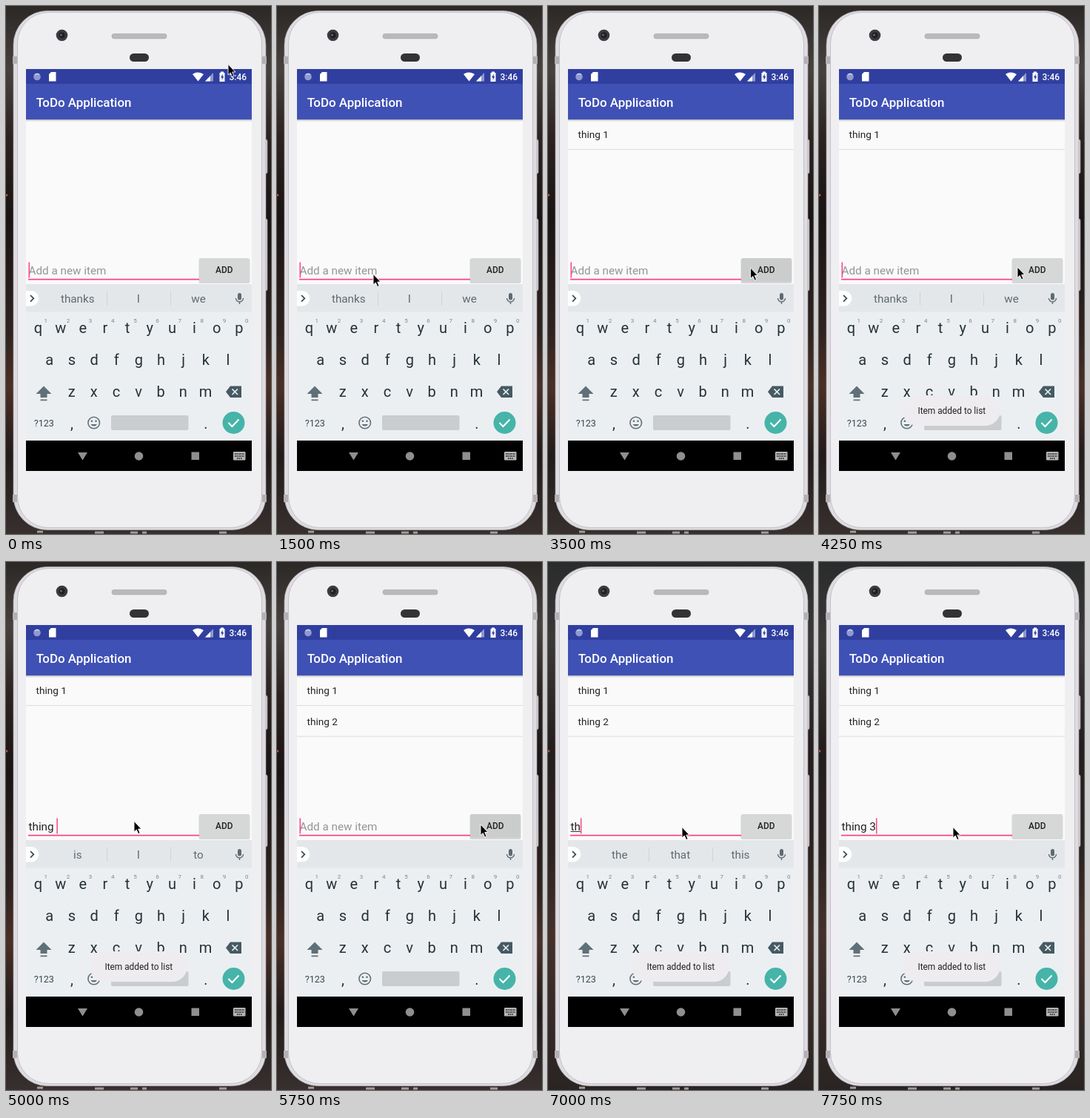
Write an HTML page that moves like this. It is 358 px wide and 712 px high and loops after 8 s.

```html
<!DOCTYPE html>
<html lang="en">
<head>
<meta charset="utf-8">
<title>ToDo Application</title>
<style>
  html, body { margin: 0; width: 100%; height: 100%; overflow: hidden; background: #1d1817; }
  svg { display: block; width: 358px; height: 712px; font-family: Roboto, sans-serif; }
  text { white-space: pre; }
  .mid { text-anchor: middle; }
  .key { font-size: 20px; fill: #263238; }
  .digit { font-size: 8px; fill: #78868c; }
  .word { font-size: 15.25px; fill: #5f6b71; }
  .entry { font-size: 15.25px; }
  .item { font-size: 13.55px; fill: #222; }
  .bold { font-weight: 500; }
</style>
</head>
<body>
<svg viewBox="0 0 358 712">
  <defs>
    <linearGradient id="room" x2="0" y2="1">
      <stop offset="0" stop-color="#2b2826"/><stop offset=".12" stop-color="#47413d"/>
      <stop offset=".25" stop-color="#2c2220"/><stop offset=".4" stop-color="#1a1414"/>
      <stop offset=".62" stop-color="#30231f"/><stop offset=".72" stop-color="#4a2f26"/>
      <stop offset=".85" stop-color="#231b1a"/><stop offset="1" stop-color="#37302e"/>
    </linearGradient>
    <linearGradient id="roomLate" x2="0" y2="1">
      <stop offset="0" stop-color="#2a2b2c"/><stop offset=".15" stop-color="#3b3938"/>
      <stop offset=".35" stop-color="#251d1d"/><stop offset=".55" stop-color="#2c2220"/>
      <stop offset=".7" stop-color="#45302a"/><stop offset="1" stop-color="#292423"/>
    </linearGradient>
    <linearGradient id="shade" x2="0" y2="1">
      <stop stop-color="#000" stop-opacity=".25"/><stop offset="1" stop-color="#000" stop-opacity="0"/>
    </linearGradient>
  </defs>

  <rect id="backdrop" width="358" height="712"/>
  <circle cx="1" cy="255" r="1.5" fill="#b0523c"/>
  <path d="M42 709h8M120 710h12M168 710h10M184 710h6M288 710h10" stroke="#a39b96" stroke-width="3"/>

  <!-- phone -->
  <g fill="#d6d4d8" stroke="#aaa8ac" stroke-width=".7">
    <rect x="348" y="180" width="5" height="46" rx="2"/>
    <rect x="348" y="287" width="5" height="97" rx="2"/>
    <rect x="10" y="6.5" width="341" height="700" rx="46" fill="#dedce0"/>
  </g>
  <path d="M9 68h6v10h-6zM346 68h6v10h-6zM9 659h6v10h-6zM346 659h6v10h-6z" fill="#b3b1b5"/>
  <rect x="15.5" y="8.5" width="330" height="695" rx="42" fill="#efeef1" stroke="#c3c1c7"/>
  <circle cx="75.5" cy="39.5" r="7.8" fill="#3b3b3d"/>
  <circle cx="75.5" cy="39.5" r="4" fill="#1d2025"/>
  <circle cx="74.5" cy="39" r="1.6" fill="#596476"/>
  <rect x="143" y="37.5" width="74" height="6.5" rx="3" fill="#b9b8bb" stroke="#a5a4a7" stroke-width=".6"/>
  <rect x="167" y="64" width="26" height="11" rx="5.5" fill="#333335"/>

  <!-- app -->
  <rect x="27" y="85" width="305" height="542" fill="#fafafa"/>
  <rect x="27" y="105" width="305" height="48" fill="#3f51b5"/>
  <rect x="27" y="85" width="305" height="20" fill="#303f9f"/>
  <rect x="27" y="153" width="305" height="3" fill="url(#shade)"/>
  <g fill="#fff">
    <circle cx="42" cy="95.5" r="4.8" fill="#8f9ad0"/>
    <path d="M39 93a4.2 4.2 0 0 1 6-.5" stroke="#cdd3ee" stroke-width="1.5" fill="none"/>
    <path d="M61 89h6.5v12.500h-9.500V92z"/>
    <path d="M252 92q7.500-5 15 0l-7.500 9.500z"/>
    <path d="M280 90v11.500h-11z" fill="#8f99cd"/><path d="M276 94.200v7.300h-7z"/>
    <path d="M290 88.500h4v1.500h1.500v12h-7V90h1.500z"/>
    <path d="M292.700 91.500l-2.700 5h1.700v3.500l2.500-5h-1.500z" fill="#303f9f"/>
    <text class="bold" x="301.500" y="99.700" font-size="12">3:46</text>
    <text class="bold" x="40.700" y="135.700" font-size="16.940">ToDo Application</text>
  </g>
  <g id="items"></g>

  <rect x="30" y="367.800" width="231" height="1.700" fill="#ff4081"/>
  <text id="entry" class="entry" x="30.500" y="362"></text>
  <rect id="underline" x="30.500" y="363" height="1" fill="#333"/>
  <rect id="caret" y="345.500" width="1.500" height="21" fill="#ff4081"/>
  <rect x="260.500" y="341" width="69" height="33" rx="2" opacity=".14"/>
  <rect id="button" x="261" y="340" width="68" height="32" rx="2"/>
  <text class="mid bold" x="294.800" y="360" font-size="11.860" fill="#222">ADD</text>

  <!-- keyboard -->
  <rect x="27" y="375" width="305" height="211" fill="#eceff1"/>
  <rect x="27" y="375" width="305" height="37.500" fill="#e4e7e9"/>
  <path d="M27 384h7a10 10 0 0 1 0 20.500h-7z" fill="#fff"/>
  <path d="M33 390l4.300 4.300-4.300 4.300" fill="none" stroke="#37474f" stroke-width="1.700"/>
  <rect x="313" y="387" width="5" height="9.500" rx="2.500" fill="#5f6b71"/>
  <path d="M310.500 394a5 5 0 0 0 10 0M315.500 399v3" fill="none" stroke="#5f6b71" stroke-width="1.400"/>
  <g id="words">
    <path d="M136.500 385v19M222.500 385v19" stroke="#d0d4d6"/>
    <text class="mid word" x="96.800" y="400"></text>
    <text class="mid word" x="178.800" y="400"></text>
    <text class="mid word" x="260" y="400"></text>
  </g>
  <g id="keys"></g>
  <g fill="#607078">
    <path d="M51 512.500l10.500 10.500h-6v5h-9v-5h-6zM46.500 530.500h9v1.800h-9z"/>
    <path d="M303 512.500h15v15.500h-15l-6-7.750z" fill="#455a64"/>
    <path d="M305.500 516.500l7.500 7.500m0-7.500l-7.500 7.500" stroke="#eceff1" stroke-width="1.700"/>
    <text class="mid" x="51.300" y="566.500" font-size="12.600" fill="#37474f">?123</text>
    <circle cx="118.700" cy="562" r="7.800" fill="none" stroke="#607078" stroke-width="1.600"/>
    <circle cx="115.900" cy="559.800" r="1.300"/><circle cx="121.500" cy="559.800" r="1.300"/>
    <path d="M114.500 564h8.400a4.500 4 0 0 1-8.400 0z"/>
  </g>
  <rect x="142" y="552" width="104.500" height="20" rx="2" fill="#c9cdcf"/>
  <circle cx="307.500" cy="562" r="15" fill="#46b4a9"/>
  <path d="M300.500 562l5 5 9-9.500" fill="none" stroke="#fff" stroke-width="2"/>

  <rect x="27" y="586" width="305" height="41"/>
  <g fill="#8f8f8f">
    <path d="M97 602h13l-6.500 10.500z"/>
    <circle cx="179.500" cy="607" r="5.800"/>
    <rect x="250.500" y="601.500" width="10.500" height="10.500"/>
    <rect x="307" y="601" width="16.500" height="11.500" rx="1.200" fill="#b5b5b5"/>
    <path d="M309 604h13M309 607h13M312 610h7" stroke="#111" stroke-width="1.300" stroke-dasharray="1.500 1"/>
  </g>

  <g id="toast">
    <rect x="113" y="525" width="132" height="41" rx="20.500" fill="#eeecef"/>
    <text class="mid" x="179.300" y="550" font-size="11.860" fill="#222">Item added to list</text>
  </g>
  <path id="pointer" d="M0 0V14.500L3.300 11.500 5.700 17 8 16 5.700 10.500H10z" stroke="#fff" stroke-width=".9"/>
</svg>

<script>
const LOOP = 8000, STEP = 250;
const $ = id => document.getElementById(id);

const label = (cls, x, y, str) => `<text class="${cls}" x="${x}" y="${y}">${str}</text>`;
const keyRow = (letters, x, y) =>
  [...letters].map((c, i) => label('mid key', x + i * 30.15, y, c)).join('');
$('keys').innerHTML =
  keyRow('qwertyuiop', 43.5, 440.7) + keyRow('asdfghjkl', 58.8, 483.7) +
  keyRow('zxcvbnm', 88.6, 526.7) + label('mid key', 89, 569.5, ',') + label('mid key', 270, 569.5, '.') +
  [...'1234567890'].map((c, i) => label('mid digit', 53.8 + i * 30.15, 426.5, c)).join('');

$('items').innerHTML = [1, 2].map(n => {
  const y = 178 + (n - 1) * 41.7;
  return `<g>${label('item', 40.5, y, 'thing ' + n)}<path d="M27 ${y + 15.5}h305" stroke="#dcdcdc"/></g>`;
}).join('');

// Each entry changes the state from its time on.
const timeline = [
  [0, { x: 300, y: 78.5, text: '', words: 'thanks I we', items: 0, toast: 0, press: false }],
  [250, { x: 285, y: 115 }],
  [500, { x: 220, y: 235 }],
  [750, { x: 150, y: 340 }],
  [1000, { x: 130, y: 363 }],
  [1500, { y: 361.5 }],
  [2000, { text: 'th', words: 'the that this' }],
  [2250, { text: 'thin', words: 'thin think things' }],
  [2500, { text: 'thing ', words: 'is I to' }],
  [2750, { text: 'thing 1', words: '' }],
  [3000, { x: 270, y: 354 }],
  [3250, { x: 273.5, y: 353, press: true }],
  [3500, { text: '', items: 1 }],
  [3750, { words: 'thanks I we', toast: 1, press: false }],
  [4250, { x: 268, y: 352 }],
  [4500, { x: 190, y: 350 }],
  [4750, { x: 173, y: 349.5, text: 'thin', words: 'thin think things' }],
  [5000, { text: 'thing ', words: 'is I to' }],
  [5250, { text: 'thing 2', words: '' }],
  [5500, { x: 268, y: 352 }],
  [5750, { x: 275, y: 354, text: '', items: 2, toast: 0, press: true }],
  [6000, { x: 225, y: 356, words: 'thanks I we', toast: 1 }],
  [6250, { x: 174, y: 357.5 }],
  [6500, { press: false }],
  [7000, { x: 181, text: 'th', words: 'the that this' }],
  [7250, { text: 'thin', words: 'thin think things' }],
  [7500, { text: 'thing ', words: 'is I to' }],
  [7750, { text: 'thing 3', words: '' }],
];

function draw(time) {
  const s = Object.assign({}, ...timeline.filter(([at]) => at <= time).map(e => e[1]));
  const entry = $('entry');
  entry.textContent = s.text || 'Add a new item';
  entry.setAttribute('fill', s.text ? '#222' : '#959595');
  const width = s.text ? entry.getComputedTextLength() : 0;
  $('caret').setAttribute('x', 30.5 + width);
  $('underline').setAttribute('width', /^[a-z]+$/.test(s.text) ? width : 0);

  const words = s.words.split(' ');
  $('words').style.display = s.words ? '' : 'none';
  $('words').querySelectorAll('text').forEach((t, i) => t.textContent = words[i] || '');
  [...$('items').children].forEach((g, i) => g.style.display = i < s.items ? '' : 'none');
  $('toast').style.opacity = s.toast;
  $('button').setAttribute('fill', s.press ? '#cbcccc' : '#d6d7d7');
  $('backdrop').setAttribute('fill', time < 7000 ? 'url(#room)' : 'url(#roomLate)');
  $('pointer').setAttribute('transform', `translate(${s.x} ${s.y})`);
}

function tick() {
  const time = performance.now() % LOOP;
  draw(time - time % STEP);
  requestAnimationFrame(tick);
}
tick();
</script>
</body>
</html>
```
